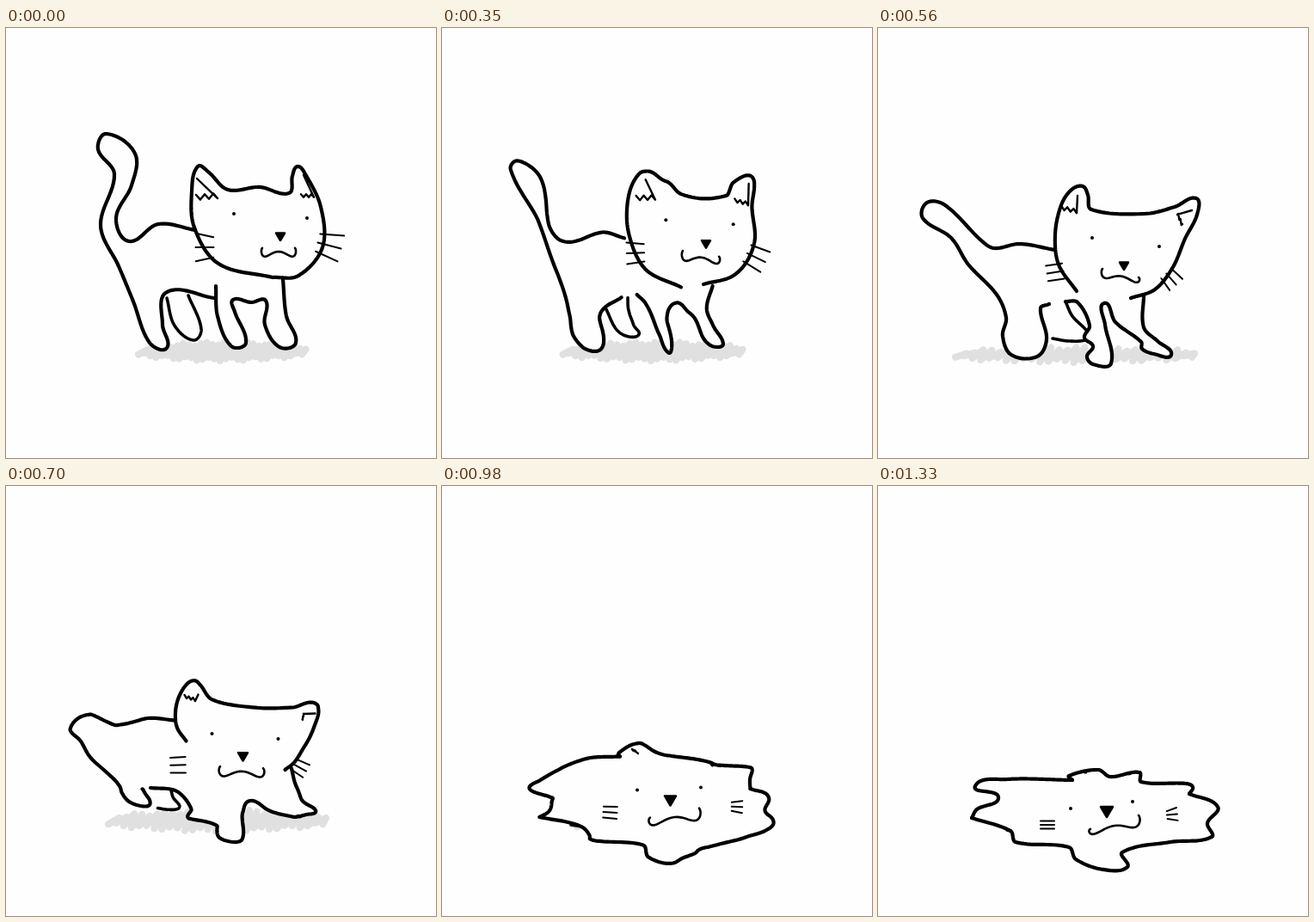
Recreate the animation shown at these times as an HTML page with a canvas. Size 500 by 500 pixels, loop 1400 ms.

```html
<!DOCTYPE html>
<html lang="en">
<head>
<meta charset="utf-8">
<title>Melting cat</title>
<style>
html, body { margin: 0; height: 100%; overflow: hidden; background: #fefefe; }
canvas { display: block; }
</style>
</head>
<body>
<canvas id="stage" width="500" height="500"></canvas>
<script>
const ctx = document.getElementById("stage").getContext("2d");
const PAPER = "#fefefe", INK = "#000", SHADE = "#e0e0e0";
const STEP = 70, STEPS = 20, HOLD = 3;

// Key poses. Outlines are key points of smooth curves; the rest feeds the drawing rules:
// shadow [left, right, y, height], ears [base, base, tip], nose [x, y, size],
// mouth [x, y, half width, wave, tilt], whiskers [x, y, length, angle, gap, spread].
const poses = [
  {
    at: 0,
    hind: "187,314 196,346 218,363 227,350 212,311",
    legs: "244,300 246,335 262,370 279,366 266,330 264,316 285,319 302,317 301,345 318,371 337,366 326,335 322,292",
    body: "242,314 187,307 182,345 187,372 167,366 148,318 131,277 110,230 126,170 107,141 117,123 150,146 146,183 128,221 143,248 177,228 220,235",
    head: "310,290 247,274 219,232 216,190 223,161 236,168 258,188 295,185 329,192 333,172 339,161 348,170 366,208 368,255 340,288 310,290",
    shadow: [158, 348, 376, 9],
    eyes: [[265, 216], [350, 221]], nose: [319, 242, 5], mouth: [317, 263, 19, 6, 0],
    ears: [[[221, 197], [246, 195], [222, 175]], [[343, 195], [358, 195], [346, 171]]],
    whiskers: [[231, 255, 21, 0, 14, -0.22], [376, 253, 28, 0.25, 13, 0.18]]
  },
  {
    at: 6,
    hind: "191,330 212,360 238,357 222,337 213,322 218,315",
    legs: "218,315 234,317 249,350 257,382 264,368 261,345 272,321 284,338 296,357 314,375 329,366 304,338 299,322 311,304",
    body: "192,313 184,345 190,362 178,377 152,368 154,354 146,310 104,249 66,177 74,170 99,188 117,228 140,249 190,242 208,249",
    head: "262,307 231,283 216,240 217,203 233,172 247,165 256,174 262,195 331,201 340,188 369,178 359,215 360,250 342,285 301,302",
    shadow: [138, 350, 376, 9],
    eyes: [[258, 227], [333, 232]], nose: [301, 255, 5], mouth: [293, 273, 22, 6, 5],
    ears: [[[228, 198], [249, 198], [244, 177]], [[339, 203], [355, 209], [362, 186]]],
    whiskers: [[222, 265, 20, -0.05, 10, -0.06], [360, 274, 21, 0.55, 11, 0.06]]
  },
  {
    at: 8,
    hind: "203,361 222,364 243,362 244,354 226,335 218,318",
    legs: "218,318 232,319 246,346 240,360 250,370 243,382 250,391 271,390 264,345 263,320 276,342 306,365 307,373 321,379 341,380 325,364 309,348 309,311",
    body: "199,321 189,326 196,362 185,382 155,380 145,358 149,337 138,310 105,275 85,244 52,221 57,203 78,206 120,247 135,256 165,251 205,258",
    head: "231,306 210,275 206,240 213,206 225,188 238,184 244,194 248,211 310,216 345,208 370,198 371,217 357,245 343,278 322,304 294,314",
    shadow: [94, 369, 380, 7],
    eyes: [[249, 244], [327, 254]], nose: [286, 276, 5], mouth: [282, 291, 21, 5, 5],
    ears: [[[213, 209], [231, 213], [232, 195]], [[354, 230], [348, 215], [365, 212]]],
    whiskers: [[206, 284, 19, -0.15, 9, 0], [341, 292, 17, 0.85, 9, 0.1]]
  },
  {
    at: 12,
    hind: "150,388 166,390",
    legs: "118,384 166,390 186,403 182,409 245,414 250,429 276,433 285,416 306,412 345,413 374,400 370,392 384,377 362,367 366,350 355,346",
    body: "118,384 138,375 138,358 122,357 100,361 89,351 103,344 125,319 158,292 188,287",
    head: "188,287 188,287 188,287 196,271 206,267 242,292 322,307 352,305 361,311 350,331 355,346",
    shadow: [152, 376, 398, 14],
    eyes: [[230, 332], [306, 334]], nose: [265, 352, 6], mouth: [266, 379, 29, 8, -3],
    ears: [[[202, 280], [209, 284], [215, 290]], [[335, 315], [345, 313], [354, 317]]],
    whiskers: [[194, 365, 16, 0.1, 9, 0.07], [344, 364, 13, 0.15, 6, 0.07]]
  },
  {
    at: 16,
    hind: "150,400 154,401",
    legs: "109,386 154,401 160,414 222,420 230,434 262,446 290,443 284,426 340,414 388,408 383,392 395,373 362,358",
    body: "109,386 115,376 140,362 113,349 150,341 226,342",
    head: "226,342 226,342 222,337 256,330 270,338 304,333 306,344 358,346 366,350 362,358",
    shadow: [170, 350, 385, 10],
    eyes: [[224, 375], [296, 367]], nose: [266, 378, 7], mouth: [275, 398, 28, 6, -8],
    ears: [[[240, 333], [242, 333], [241, 332]], [[291, 335], [294, 334], [293, 335]]],
    whiskers: [[197, 394, 16, 0, 4.5, 0], [342, 382, 12, -0.1, 6, 0.25]]
  }
];

const lerp = (a, b, k) => a + (b - a) * k;
const mix = (a, b, k) => Array.isArray(a) ? a.map((v, i) => mix(v, b[i], k)) : lerp(a, b, k);
const range = (n, fn) => Array.from({ length: n + 1 }, (_, i) => fn(i / n, i));

// Hermite curve whose tangents scale with each segment, so uneven spacing stays smooth.
function smooth(points, samples = 200) {
  const last = points.length - 1;
  const pick = i => points[Math.max(0, Math.min(last, i))];
  return range(samples, t => {
    const i = Math.min(last - 1, Math.floor(t * last)), u = t * last - i;
    const [a, b, c, d] = [-1, 0, 1, 2].map(k => pick(i + k));
    const length = Math.hypot(c[0] - b[0], c[1] - b[1]);
    const tangent = (p, q, k) => (q[k] - p[k]) / (Math.hypot(q[0] - p[0], q[1] - p[1]) || 1) * length;
    const ease = u * u * (3 - 2 * u), v = 1 - u;
    return [0, 1].map(k => lerp(b[k], c[k], ease)
      + u * v * v * tangent(a, c, k) - u * u * v * tangent(b, d, k));
  });
}

for (const pose of poses) {
  for (const name of ["hind", "legs", "body", "head"]) {
    pose[name] = smooth(pose[name].split(" ").map(p => p.split(",").map(Number)));
  }
}

function trace(points) {
  ctx.beginPath();
  points.forEach(([x, y]) => ctx.lineTo(x, y));
}

function stroke(points, width, color = INK) {
  trace(points);
  ctx.lineWidth = width;
  ctx.strokeStyle = color;
  ctx.stroke();
}

function fill(points, color) {
  trace(points);
  ctx.fillStyle = color;
  ctx.fill();
}

function drawShadow([left, right, y, height]) {
  stroke(range(56, (k, i) => {
    const side = i % 2 ? 1 : -1;
    const reach = height * (0.4 + 0.6 * Math.sin(Math.PI * k));
    return [lerp(left, right, k) + side * 4, y - side * reach + 2 * Math.sin(i * 2.3)];
  }), 8, SHADE);
}

// Tufts of fur along the base, then a line up to the tip.
function drawEar([from, to, tip]) {
  const tuft = 0.12 * Math.hypot(to[0] - from[0], to[1] - from[1]);
  const fur = range(5, (k, i) => {
    const [x, y] = mix(from, to, k);
    return [x, y + (i % 2 ? tuft : -tuft)];
  });
  stroke([...fur, tip], 2.4);
}

function drawNose([x, y, size]) {
  const triangle = [[x - size, y - size * 0.7], [x + size, y - size * 0.7], [x, y + size], [x - size, y - size * 0.7]];
  fill(triangle, INK);
  stroke(triangle, 2.5);
}

function drawMouth([x, y, halfWidth, wave, tilt]) {
  stroke(range(40, k => {
    const u = 2 * k - 1;
    return [x + halfWidth * Math.sin(u * 1.9) / Math.sin(1.9),
      y + tilt * u - wave * (0.5 * Math.cos(2 * Math.PI * u) + 0.7 * u ** 4)];
  }), 2.6);
}

function drawWhiskers([x, y, length, angle, gap, spread]) {
  for (const i of [-1, 0, 1]) {
    const cx = x - i * gap * Math.sin(angle), cy = y + i * gap * Math.cos(angle);
    const dx = length / 2 * Math.cos(angle + i * spread), dy = length / 2 * Math.sin(angle + i * spread);
    stroke([[cx - dx, cy - dy], [cx + dx, cy + dy]], 2);
  }
}

function draw(step) {
  const next = poses.findIndex(pose => pose.at > step);
  const to = poses[next] || poses.at(-1), from = poses[next - 1] || to;
  const start = Math.max(HOLD, from.at);
  const k = from === to ? 0 : Math.max(0, (step - start) / (to.at - start));
  const part = name => mix(from[name], to[name], k);
  const [hind, legs, body, head] = ["hind", "legs", "body", "head"].map(part);

  ctx.fillStyle = PAPER;
  ctx.fillRect(0, 0, 500, 500);
  drawShadow(part("shadow"));
  fill(hind, PAPER);
  stroke(hind, 3.6);
  fill([...body, ...head, ...legs.slice().reverse()], PAPER);
  for (const outline of [legs, body, head]) stroke(outline, 4.2);

  part("ears").forEach(drawEar);
  for (const eye of part("eyes")) stroke([eye, eye], 4);
  drawNose(part("nose"));
  drawMouth(part("mouth"));
  part("whiskers").forEach(drawWhiskers);
}

ctx.lineCap = ctx.lineJoin = "round";

function tick() {
  draw(Math.floor(performance.now() / STEP) % STEPS);
  requestAnimationFrame(tick);
}
tick();
</script>
</body>
</html>
```
